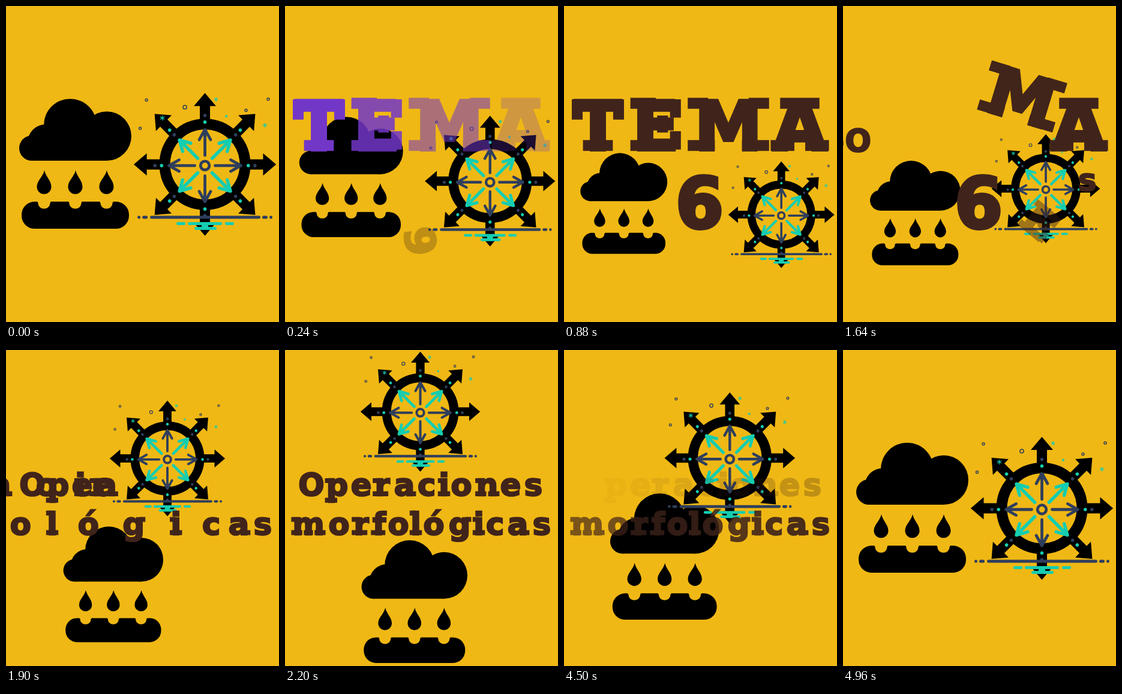
These frames come from a looping animation (455x525 px, 5 s). An HTML page:

```html
<!DOCTYPE html>
<html lang="es">
<head>
<meta charset="utf-8">
<title>Operaciones morfológicas</title>
<style>
html, body { margin: 0; width: 100%; height: 100%; overflow: hidden; background: #f0b814; }
svg { display: block; width: 455px; height: 525px; }
text { font-family: "DejaVu Sans", Verdana, sans-serif; font-weight: bold; text-anchor: middle; }
.slab { fill: none; stroke-width: 0.16; }
.navy { fill: #2f3e5c; }
.teal { fill: #15cdb0; }
.navy-line { fill: none; stroke: #2f3e5c; stroke-linecap: round; stroke-linejoin: round; }
.teal-line { fill: none; stroke: #15cdb0; stroke-linecap: round; stroke-linejoin: round; }
</style>
</head>
<body>
<svg id="stage" viewBox="0 0 455 525">
  <rect width="455" height="525" fill="#f0b814"/>
  <g id="cloud"></g>
  <g id="wheel"></g>
  <g id="letters"></g>
</svg>
<script>
const LOOP = 5000;
const BG = '#f0b814';
const BROWN = [64, 36, 27];
const PURPLE = [115, 55, 200];
const byId = id => document.getElementById(id);
const clamp = v => Math.max(0, Math.min(1, v));
const mix = (a, b, k) => a + (b - a) * k;
const progress = (t, start, length) => clamp((t - start) / length);
const sineEase = k => (1 - Math.cos(Math.PI * k)) / 2;
const easeOut = k => 1 - (1 - k) ** 2;

// Both icons are drawn in their opening layout.
function cloudArt() {
  const drops = [63.5, 115.5, 167.5];
  return `
    <circle cx="43" cy="236" r="21"/><circle cx="66" cy="226.5" r="30"/>
    <circle cx="107" cy="198" r="44"/><circle cx="168" cy="216" r="41"/>
    <path d="M43 257V230L70 205H150L168 216V257Z"/>
    <rect x="26" y="325" width="179" height="45" rx="21.5"/>` +
    drops.map(x => `<g transform="translate(${x})">
      <path d="M0.5 273C3 284 12 290 12 300.3A12 12 0 0 1-12 300.3C-12 290-2 284 0.5 273Z"/>
      <path fill="${BG}" d="M-13.5 324Q-10 325-10 328A10 8.7 0 0 0 10 328Q10 325 13.5 324Z"/></g>`).join('');
}

function spoke(i) {
  const diagonal = i % 2;
  const [outer, inner] = diagonal ? ['teal', 'navy'] : ['navy', 'teal'];
  return {
    arrow: `<path transform="rotate(${i * 45})" d="M-8.5-70V-97H-18.5L0-118.7L18.5-97H8.5V-70Z"/>`,
    detail: `<g transform="translate(0 2) rotate(${i * 45})">
      <circle class="${outer}" cy="-83.3" r="2.8"/><circle class="${inner}" cy="-72.3" r="2.8"/>
      <path class="${diagonal ? 'teal' : 'navy'}-line" stroke-width="${diagonal ? 5.6 : 4.8}"
        d="M0-17V-59M-9.5-43L0-60L9.5-43"/></g>`
  };
}

function star(x, y, r) {
  const arms = [0, 60, 120].map(a =>
    `<path class="teal-line" stroke-width="1.2" transform="rotate(${a})" d="M0 ${-r}V${r}"/>`);
  return `<g transform="translate(${x} ${y})">${arms.join('')}</g>`;
}

function wheelArt() {
  const spokes = Array.from({ length: 8 }, (_, i) => spoke(i));
  const rings = [[-97.5, -107, 2], [-33.5, -95, 3.1], [68.5, -90, 2], [105.5, -108.5, 2], [-108, -60, 2]];
  return spokes.map(s => s.arrow).join('') +
    '<circle r="67" fill="none" stroke="#000" stroke-width="18"/>' +
    spokes.map(s => s.detail).join('') +
    '<circle class="navy-line" cy="2" r="7.3" stroke-width="4.8"/>' +
    rings.map(([x, y, r]) => `<circle class="navy-line" cx="${x}" cy="${y}" r="${r}" stroke-width="1.5"/>`).join('') +
    star(-71, -77, 3.6) + star(18.5, -108, 2.8) + star(35.5, -80, 1.8) + star(100, -65, 3.2) +
    `<path class="navy-line" stroke-width="5" d="M-110 88h.01M-102 88h4M-89 88H90M98 88h4M110 88h.01"/>
     <path class="teal-line" stroke-width="5" d="M-45 98.5h10M-26 98.5H26M36 98.5h10M-15 106.5H17"/>
     <rect class="teal" x="-5.5" y="99" width="11" height="7"/>`;
}

byId('cloud').innerHTML = cloudArt();
byId('wheel').innerHTML = wheelArt();

// Slab serifs added to the letters, in ems from the middle of the baseline.
const slabs = {
  T: 'M-.22-.06H.22M-.305-.74V-.44M.305-.74V-.44',
  E: 'M-.375-.06H0M-.375-.68H0M.29-.74V-.47M.29 0V-.27M.1-.5V-.25',
  M: 'M-.6-.06H-.2M.6-.06H.2M-.6-.68H-.3M.6-.68H.3',
  A: 'M-.43-.06H-.08M.43-.06H.08M-.29-.68H.29',
  p: 'M-.4.15H0M-.4-.49H-.1',
  r: 'M-.31-.06H.2M-.31-.49H-.05',
  a: 'M.17-.06H.38',
  i: 'M-.2-.06H.2M-.2-.49H0',
  n: 'M-.39-.06H-.03M.03-.06H.4M-.39-.49H-.1',
  m: 'M-.56-.06H-.2M-.15-.06H.15M.2-.06H.56M-.56-.49H-.3',
  f: 'M-.27-.06H.2',
  l: 'M-.2-.06H.2M-.2-.7H0',
  g: 'M.2-.49H.38'
};

function makeLetters(chars, centers, baseline, size) {
  return [...chars].map((char, i) => {
    const el = document.createElementNS('http://www.w3.org/2000/svg', 'g');
    const half = size * 0.36;
    el.innerHTML = `<text y="${half}" font-size="${size}" stroke-width="${size * 0.05}">${char}</text>
      <path class="slab" transform="translate(0 ${half}) scale(${size})" d="${slabs[char] || ''}"/>`;
    byId('letters').append(el);
    return { el, x: centers[i], y: baseline - half };
  });
}

const firstLine = makeLetters('Operaciones', [44, 87, 127, 162, 199, 236, 265, 294, 337, 376, 414], 242, 51);
const secondLine = makeLetters('morfológicas', [39, 90, 127, 157, 189, 218, 248, 291, 323, 350, 388, 428], 306.5, 51);
const heading = makeLetters('TEMA', [56.5, 153, 274, 393], 238.5, 113);
const [six] = makeLetters('6', [226], 368, 115);

function place(letter, { dx = 0, dy = 0, turn = 0, scale = 1, alpha = 1, color = BROWN }) {
  const { el, x, y } = letter;
  const paint = `rgb(${color.map(Math.round)})`;
  el.setAttribute('transform', `translate(${x + dx} ${y + dy}) rotate(${turn}) scale(${scale})`);
  el.setAttribute('fill', paint);
  el.setAttribute('stroke', paint);
  el.setAttribute('opacity', clamp(alpha));
  el.style.display = alpha > 0.004 ? '' : 'none';
}

// Thrown up, over to the right and down while shrinking.
const fling = u => ({
  dx: 500 * u ** 2.33,
  dy: -489 * u + 1166 * u * u,
  turn: 62 * u,
  scale: Math.max(0.05, 1 - 1.5 * u ** 3),
  alpha: u < 1 ? 1.4 - 1.5 * u : 0
});

const poses = {
  cloud: [[22, 154, 1], [27.3, 244.3, 0.775], [127.5, 316, 0.944]],
  wheel: [[331.5, 263, 1], [362.2, 346.7, 0.745], [225.5, 102.5, 0.84]]
};

function poseAt(list, t) {
  const [open, middle, last] = list;
  const blend = (a, b, start, length) => {
    const k = sineEase(progress(t, start, length));
    return a.map((v, i) => mix(v, b[i], k));
  };
  if (t < 1400) return blend(open, middle, -18, 658);
  if (t < 3000) return blend(middle, last, 1430, 760);
  return blend(last, open, 4130, 760);
}

function drawHeading(t) {
  const k = progress(t, 440, 420);
  const color = PURPLE.map((v, i) => mix(v, BROWN[i], k));
  heading.forEach((letter, i) => {
    const out = fling(progress(t, 1420 + 80 * i, 220));
    out.alpha = Math.min(out.alpha, progress(t, 10 + 60 * i, 200));
    place(letter, { ...out, color });
  });
  const p = progress(t, 0, 880);
  place(six, t < 1400
    ? { dy: 88 * (1 - p), turn: 360 * (1 - p), scale: 0.44 + 0.56 * p, alpha: p }
    : fling(progress(t, 1740, 220)));
}

function drawLine(line, t, enterAt, leaveAt) {
  line.forEach((letter, i) => {
    const k = easeOut(progress(t, enterAt(i), 230));
    place(letter, {
      dx: -(letter.x + 50) * (1 - k),
      alpha: k > 0 ? 1 - progress(t, leaveAt + 10 * i, 370) : 0
    });
  });
}

function render(t) {
  const [cx, cy, cs] = poseAt(poses.cloud, t);
  const [wx, wy, ws] = poseAt(poses.wheel, t);
  byId('cloud').setAttribute('transform', `translate(${cx} ${cy}) scale(${cs}) translate(-22 -154)`);
  byId('wheel').setAttribute('transform', `translate(${wx} ${wy}) scale(${ws})`);
  drawHeading(t);
  drawLine(firstLine, t, i => 1513 + 97 * i ** 0.65, 4130);
  drawLine(secondLine, t, i => 1458 + 185 * (11 - i) ** 0.4, 4380);
}

let began = null;
function tick(now) {
  began ??= now;
  render((now - began) % LOOP);
  requestAnimationFrame(tick);
}
render(0);
requestAnimationFrame(tick);
</script>
</body>
</html>
```
